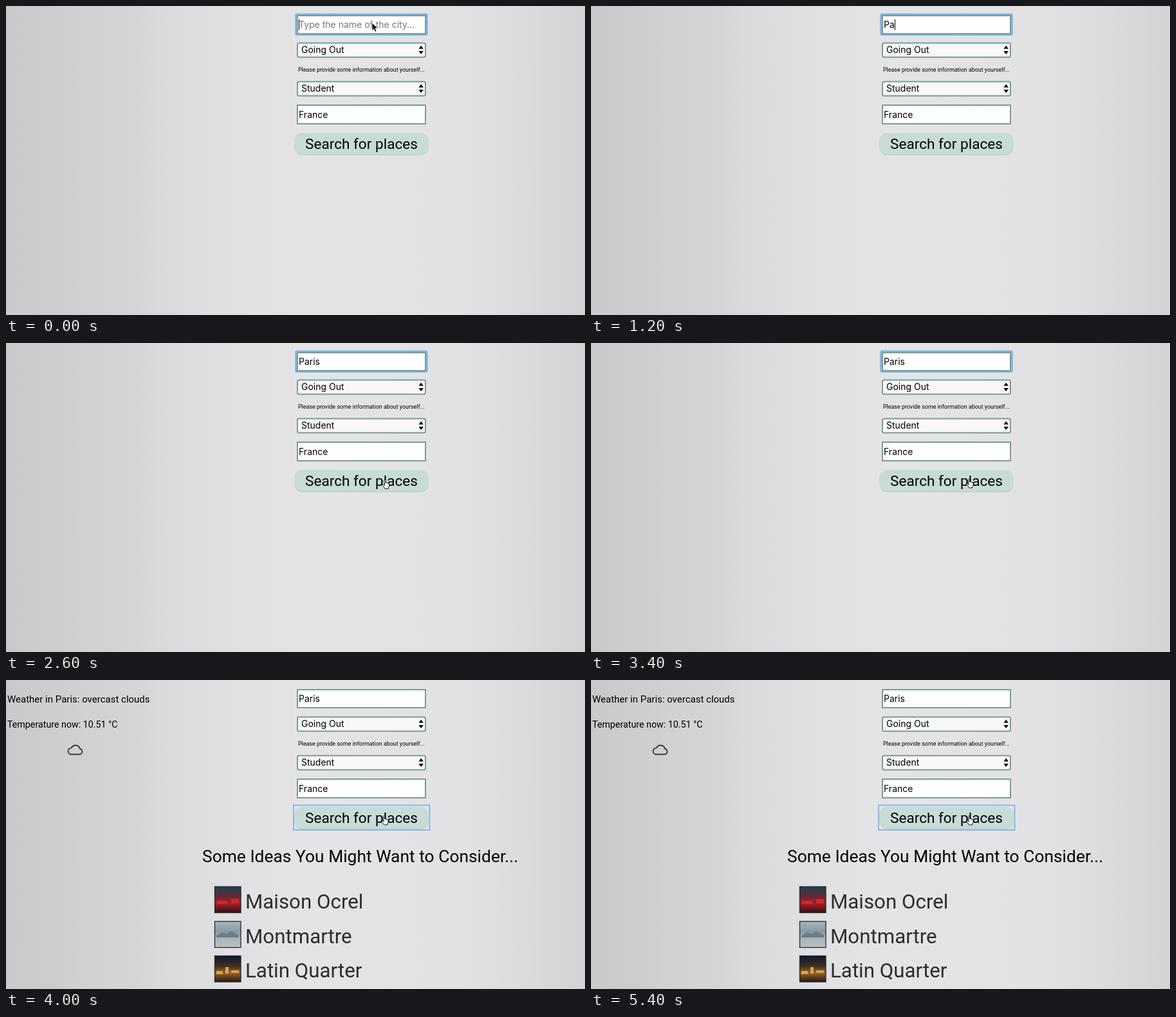
These frames come from a looping animation (900x480 px, 6 s). An HTML page:

```html
<!DOCTYPE html>
<html lang="en">
<head>
<meta charset="utf-8">
<title>City ideas</title>
<style>
html, body { margin: 0; width: 100%; height: 100%; overflow: hidden; }
svg { display: block; width: 900px; height: 480px; font-family: Roboto, "Open Sans", sans-serif; }
.field { fill: #fff; stroke: #7b9e90; stroke-width: 2; }
.select { fill: #f8f8f8; }
.value { font: 14px Inter, Roboto, sans-serif; }
.idea { font-size: 31.3px; fill: #2d2d2e; }
.focus { fill: none; stroke: #80b3ea; }
</style>
</head>
<body>
<svg viewBox="0 0 900 480">
  <defs>
    <linearGradient id="wall">
      <stop offset="0" stop-color="#c9c9c9"/>
      <stop offset=".12" stop-color="#cfd0cf"/>
      <stop offset=".22" stop-color="#d4d5d4"/>
      <stop offset=".28" stop-color="#dadbdb"/>
      <stop offset=".4" stop-color="#e1e1e3"/>
      <stop offset=".52" stop-color="#e4e4e6"/>
      <stop offset=".78" stop-color="#e2e2e4"/>
      <stop offset=".87" stop-color="#dddddd"/>
      <stop offset="1" stop-color="#d3d3d3"/>
    </linearGradient>
    <linearGradient id="red" x2="0" y2="1">
      <stop offset="0" stop-color="#1d4052"/>
      <stop offset=".4" stop-color="#6b2733"/>
      <stop offset=".65" stop-color="#a51d26"/>
      <stop offset="1" stop-color="#2c1419"/>
    </linearGradient>
    <linearGradient id="gray" x2="0" y2="1">
      <stop offset="0" stop-color="#a6b6bf"/>
      <stop offset=".4" stop-color="#8798a3"/>
      <stop offset=".6" stop-color="#a9b2b7"/>
      <stop offset="1" stop-color="#bcc0c2"/>
    </linearGradient>
    <linearGradient id="night" x2="0" y2="1">
      <stop offset="0" stop-color="#0d1730"/>
      <stop offset=".4" stop-color="#40301f"/>
      <stop offset=".65" stop-color="#98652a"/>
      <stop offset="1" stop-color="#24160f"/>
    </linearGradient>
    <path id="arrows" d="M641.5 66.5l3.7-5 3.7 5zm0 3.5l3.7 5 3.7-5z"/>
  </defs>

  <rect width="900" height="480" fill="url(#wall)"/>

  <rect id="inputFocus" class="focus" x="451" y="13.3" width="203" height="31" rx="1.5" stroke-width="3.5"/>
  <rect class="field" x="453" y="15" width="199" height="28"/>
  <text id="city" class="value" x="455" y="34"></text>
  <path id="caret" d="M0 20.5v17" stroke="#000"/>

  <rect class="field select" x="453" y="57.5" width="199" height="22" rx="2.5"/>
  <text class="value" x="459" y="73">Going Out</text>
  <use href="#arrows"/>
  <text x="454" y="102" font-size="8.92">Please provide some information about yourself...</text>
  <rect class="field select" x="453" y="117.5" width="199" height="22" rx="2.5"/>
  <text class="value" x="459" y="133">Student</text>
  <use href="#arrows" y="60"/>
  <rect class="field" x="453" y="154" width="199" height="29"/>
  <text class="value" x="455" y="174">France</text>

  <rect x="448.5" y="198" width="208" height="33.5" rx="12" fill="#b4c5c0"/>
  <rect x="448.5" y="197" width="208" height="33.5" rx="12" fill="#c8dcd6"/>
  <rect id="buttonFocus" class="focus" x="447" y="194.5" width="211.5" height="38.5" stroke-width="1.8"/>
  <text x="465" y="222" font-size="22.6">Search for places</text>

  <g id="weather">
    <text x="2" y="35" font-size="15">Weather in Paris: overcast clouds</text>
    <text x="2" y="74" font-size="14.25">Temperature now: 10.51 °C</text>
  </g>

  <g id="ideas">
    <path d="M100.5 115.5h14a4.4 4.4 0 0 0 .3-8.7a7 7 0 0 0-13.2-1.2a5 5 0 0 0-1.1 9.9z"
          fill="none" stroke="#3a3a3c" stroke-width="1.9"/>
    <text x="305" y="283" font-size="26.4">Some Ideas You Might Want to Consider...</text>
    <g stroke="#25282c" stroke-width="1.3">
      <rect x="324.5" y="321" width="40.5" height="40.5" fill="url(#red)"/>
      <rect x="324.5" y="375" width="40.5" height="40.5" fill="url(#gray)"/>
      <rect x="324.5" y="428.5" width="40.5" height="40.5" fill="url(#night)"/>
    </g>
    <path d="M328 343h16v5h-16zm22-3h12v7h-12z" fill="#d3242d"/>
    <path d="M327 397l9-5 8 2 6-4 12 6v4h-35z" fill="#687f8e"/>
    <path d="M327 452h10v5h-10zm14-6h5v10h-5zm9 5h12v4h-12z" fill="#dba34a"/>
    <text class="idea" x="372" y="355">Maison Ocrel</text>
    <text class="idea" x="372" y="408.5">Montmartre</text>
    <text class="idea" x="372" y="462">Latin Quarter</text>
  </g>

  <path id="arrow" d="M0 0v12.2l2.8-2.6 2 4.6 2.2-1-2-4.4h3.7z" stroke="#fff" stroke-width=".8"/>
  <path id="beam" d="M-2.5-6q2 0 2.5 1q.5-1 2.5-1M0-5v10M-2.5 6q2 0 2.5-1q.5 1 2.5 1M-1.5 2h3" fill="none" stroke="#222"/>
  <path id="hand" d="M-1.2 1q1.2-2 2.4 0v4l1-.5 1.2.8 1-.3 1 1 1.2 0v4l-1.2 2v2h-5.4l-3.4-5q-.6-2 1-1.5l2.2 1.5z"
        fill="#fff" stroke="#111" stroke-width="1"/>
</svg>
<script>
const $ = id => document.getElementById(id);
const show = (id, on) => $(id).style.display = on ? "" : "none";

const keyTimes = [900, 1100, 1300, 1400, 1600];
// time, x, y of the pointer after typing
const path = [[1500, 571, 49], [1700, 571, 49], [2100, 571.5, 44], [2300, 586, 205], [2400, 590, 213], [2900, 587.5, 211]];
const click = 3600, weatherAt = 3800, ideasAt = 4000;

function pointer(t) {
  if (t < 100) return ["arrow", 569, 26];
  if (t < 900) return ["beam", 571, 33];
  if (t < 1500) return ["", 0, 0];
  const next = path.findIndex(p => p[0] > t);
  if (next < 0) return ["hand", ...path.at(-1).slice(1)];
  const [t0, x0, y0] = path[next - 1], [t1, x1, y1] = path[next];
  const k = (t - t0) / (t1 - t0);
  const x = x0 + (x1 - x0) * k, y = y0 + (y1 - y0) * k;
  return [y < 47 ? "beam" : y < 197 ? "arrow" : "hand", x, y];
}

function caretOn(t) {
  if (t < 900) return t < 500;
  return t < 2400 || (t >= 2900 && t < 3400);
}

function draw(t) {
  const city = $("city");
  const typed = keyTimes.filter(k => t >= k).length;
  city.textContent = typed ? "Paris".slice(0, typed) : "Type the name of the city...";
  city.setAttribute("fill", typed ? "#000" : "#777");
  const caretX = typed ? Math.round(455 + city.getComputedTextLength()) + .5 : 455.5;
  $("caret").setAttribute("transform", `translate(${caretX})`);
  show("caret", caretOn(t));
  show("inputFocus", t < click);
  show("buttonFocus", t >= click);
  show("weather", t >= weatherAt);
  show("ideas", t >= ideasAt);

  const [kind, x, y] = pointer(t);
  for (const id of ["arrow", "beam", "hand"]) show(id, id === kind);
  if (kind) $(kind).setAttribute("transform", `translate(${x} ${y})`);
}

function tick() {
  draw(Math.floor(performance.now() % 6000 / 100) * 100);
  requestAnimationFrame(tick);
}
tick();
</script>
</body>
</html>
```
